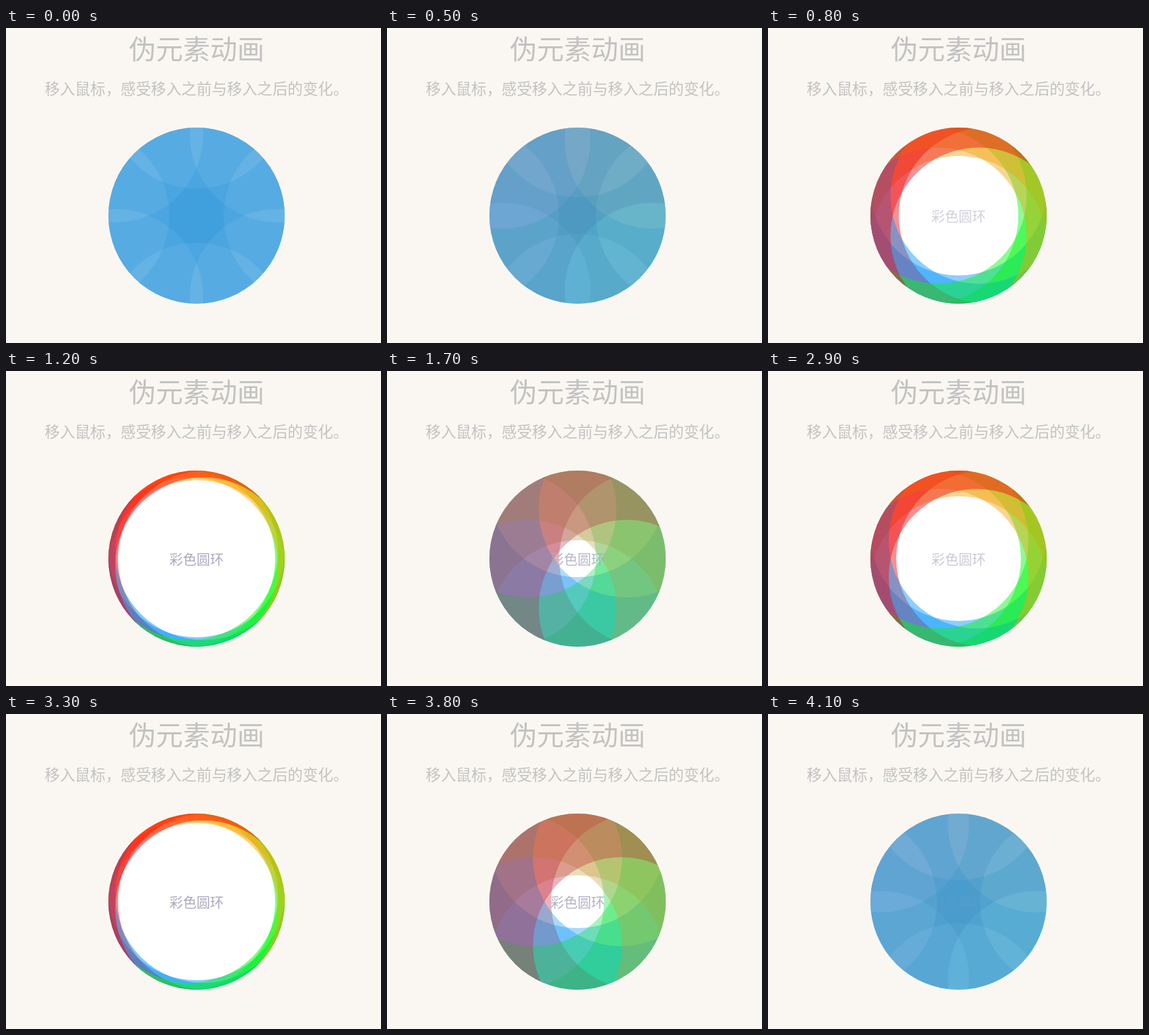
Recreate the animation shown at these times as an HTML page. Size 553 by 465 pixels, loop 4200 ms.

```html
<!DOCTYPE html>
<html lang="zh-CN">
<head>
<meta charset="utf-8">
<title>伪元素动画</title>
<style>
  html, body { margin: 0; width: 100%; height: 100%; overflow: hidden; background: #faf7f2; }
  svg { display: block; }
  text { font-family: "Noto Sans CJK SC", "Noto Sans CJK", sans-serif; text-anchor: middle; fill: #c2c2c2; }
  .title { font-size: 40px; font-weight: 350; }
  .hint { font-size: 22.4px; }
  .label { font-size: 20px; font-weight: 350; fill: #aaa8be; }
</style>
</head>
<body>
<svg width="553" height="465" viewBox="0 0 553 465">
  <defs><clipPath id="disc"><circle cx="281" cy="277" r="130"/></clipPath></defs>
  <text class="title" x="281" y="46">伪元素动画</text>
  <text class="hint" x="281" y="97.5">移入鼠标，感受移入之前与移入之后的变化。</text>
  <circle cx="281" cy="277" r="129.5" fill="#fff"/>
  <g id="shadows" clip-path="url(#disc)"></g>
  <text class="label" id="label" x="281" y="285.5">彩色圆环</text>
</svg>
<script>
const LOOP = 4200, STEP = 100, DURATION = 700;
const CX = 281, CY = 277, R = 130;
const REST = { color: [29, 141, 213], alpha: 0.2 };
const HOVER_ALPHA = 0.5;
const RED = [255, 0, 0], ORANGE = [255, 165, 0], GREEN = [0, 255, 0], BLUE = [0, 150, 255];

// Offset directions, listed from the top layer to the bottom one.
const layers = [
  [1, 1, RED], [-1, 1, ORANGE], [-1, -1, GREEN], [1, -1, BLUE],
  [1, 0, RED], [0, 1, ORANGE], [-1, 0, GREEN], [0, -1, BLUE]
].map(([dx, dy, color]) => ({ dx, dy, color }));

// Start times of the hover (enter) and its end (leave).
const enters = [436, 2517], leaves = [1469, 3597];

const group = document.getElementById("shadows");
const label = document.getElementById("label");
for (const layer of [...layers].reverse()) {
  layer.path = document.createElementNS("http://www.w3.org/2000/svg", "path");
  layer.path.setAttribute("fill-rule", "evenodd");
  group.append(layer.path);
}

const mix = (a, b, k) => a + (b - a) * k;
const clamp = x => Math.min(1, Math.max(0, x));

// cubic-bezier(.25, .1, .25, 1)
function ease(x) {
  if (x <= 0 || x >= 1) return clamp(x);
  let lo = 0, hi = 1;
  for (let i = 0; i < 24; i++) {
    const u = (lo + hi) / 2, v = 1 - u;
    if (0.75 * v * u + u ** 3 < x) lo = u; else hi = u;
  }
  const u = lo, v = 1 - u;
  return 0.3 * v * v * u + 3 * v * u * u + u ** 3;
}

const easeInOut = x => x < 0.5 ? 4 * x ** 3 : 1 - 4 * (1 - x) ** 3;

function hoverAmount(t, curve) {
  const ramp = start => curve(clamp((t - start) / DURATION));
  return enters.reduce((sum, start, i) => sum + ramp(start) - ramp(leaves[i]), 0);
}

function ringPath(x, y) {
  return `M0 0H553V465H0Z M${x - R} ${y}a${R} ${R} 0 1 0 ${2 * R} 0a${R} ${R} 0 1 0 ${-2 * R} 0Z`;
}

function draw(t) {
  const p = hoverAmount(t, ease);
  const alpha = mix(REST.alpha, HOVER_ALPHA, p);
  const tint = p * HOVER_ALPHA / alpha; // premultiplied colour blend
  for (const { dx, dy, color, path } of layers) {
    const shift = dx && dy ? mix(120, 10, p) : mix(170, 14, p);
    const rgb = color.map((c, i) => Math.round(mix(REST.color[i], c, tint)));
    path.setAttribute("d", ringPath(CX + dx * shift, CY + dy * shift));
    path.setAttribute("fill", `rgb(${rgb})`);
    path.setAttribute("fill-opacity", alpha);
  }
  label.setAttribute("opacity", clamp(hoverAmount(t, easeInOut)));
}

const began = performance.now();
function tick() {
  const t = (performance.now() - began) % LOOP;
  draw(Math.floor(t / STEP) * STEP);
  requestAnimationFrame(tick);
}
tick();
</script>
</body>
</html>
```
